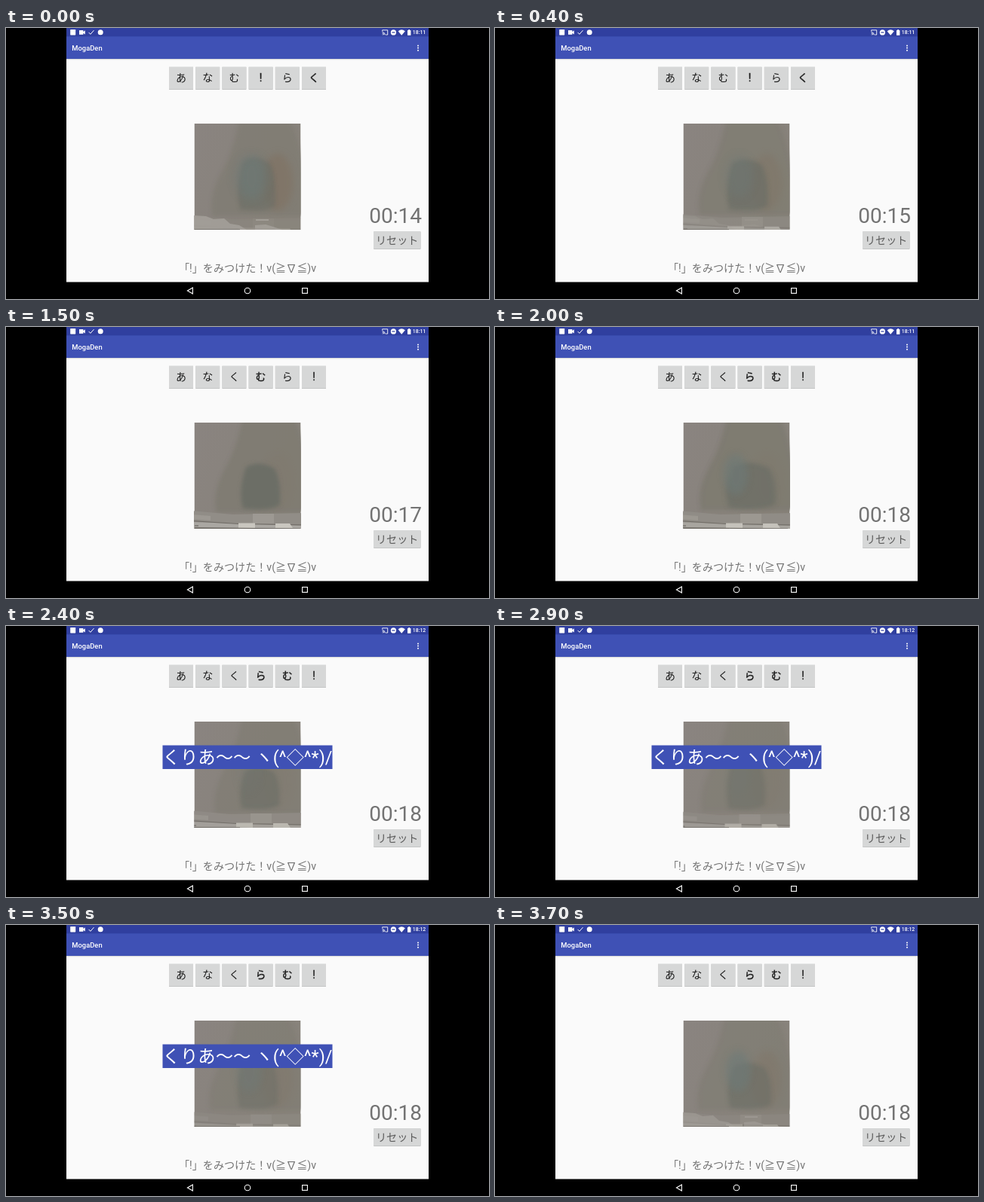
Animation, 640 px wide and 360 px high, one loop 3.8 s. Source, as an HTML page:

```html
<!DOCTYPE html>
<html lang="ja">
<head>
<meta charset="utf-8">
<title>MogaDen</title>
<style>
html, body { margin: 0; width: 100%; height: 100%; overflow: hidden; background: #000; }
svg { display: block; width: 100vw; height: 100vh; }
text { font-family: Roboto, "Noto Sans CJK JP", "Noto Sans CJK", sans-serif; }
.mid { text-anchor: middle; }
.white { fill: #fff; }
.line { fill: none; stroke: #fff; }
.tiles { font-size: 14px; fill: #1c1c1c; }
.tiles tspan { stroke: #1c1c1c; stroke-width: .35px; }
.timer { font-size: 28px; fill: #737373; text-anchor: end; }
.clock { font-size: 6.9px; font-weight: 500; fill: #fff; text-anchor: end; }

/* hard switches */
.sw { visibility: hidden; animation: 3800ms step-end infinite; }
.s14 { animation-name: s14; } .s15 { animation-name: s15; } .s16 { animation-name: s16; }
.s17 { animation-name: s17; } .s18 { animation-name: s18; }
.o1 { animation-name: o1; } .o2 { animation-name: o2; } .o3 { animation-name: o3; } .o4 { animation-name: o4; }
.m11 { animation-name: m11; } .m12 { animation-name: m12; } .clear { animation-name: clear; }
@keyframes s14 { 0% { visibility: visible } 10.5%, 100% { visibility: hidden } }
@keyframes s15 { 0% { visibility: hidden } 10.5% { visibility: visible } 23.6%, 100% { visibility: hidden } }
@keyframes s16 { 0% { visibility: hidden } 23.6% { visibility: visible } 36.8%, 100% { visibility: hidden } }
@keyframes s17 { 0% { visibility: hidden } 36.8% { visibility: visible } 49.9%, 100% { visibility: hidden } }
@keyframes s18 { 0% { visibility: hidden } 49.9%, 100% { visibility: visible } }
@keyframes o1 { 0% { visibility: visible } 15.7%, 100% { visibility: hidden } }
@keyframes o2 { 0% { visibility: hidden } 15.7% { visibility: visible } 34.2%, 100% { visibility: hidden } }
@keyframes o3 { 0% { visibility: hidden } 34.2% { visibility: visible } 49.9%, 100% { visibility: hidden } }
@keyframes o4 { 0% { visibility: hidden } 49.9%, 100% { visibility: visible } }
@keyframes m11 { 0% { visibility: visible } 57.8%, 100% { visibility: hidden } }
@keyframes m12 { 0% { visibility: hidden } 57.8%, 100% { visibility: visible } }
@keyframes clear { 0% { visibility: hidden } 55.2% { visibility: visible } 94.7%, 100% { visibility: hidden } }

/* camera view */
.cam * { transform-box: fill-box; transform-origin: center; }
.wall, .core, .tint, .warm, .floor, .lumps { animation: 3800ms linear infinite; }
.wall { animation-name: wall; } .core { animation-name: core; } .tint { animation-name: tint; }
.warm { animation-name: warm; } .floor { animation-name: floor; } .lumps { animation-name: lumps; }
@keyframes wall {
  0%, 100% { transform: translate(4px, 4px); opacity: .7 }
  23.7% { transform: translate(-2px, 0); opacity: .8 }
  39.5% { transform: translate(9px, 0); opacity: .9 }
  52.6% { transform: translate(3px, -3px); opacity: 1 }
  63.2% { transform: translate(8px, 3px); opacity: .6 }
  86.8% { transform: translate(2px, 0); opacity: .5 }
  97.4% { transform: translate(0, 0); opacity: .6 }
}
@keyframes core {
  0%, 100% { transform: translate(-5px, -2px) scale(.95, 1.15); opacity: .6 }
  23.7% { transform: translate(0, 0) scale(1.15, 1.05); opacity: .8 }
  39.5% { transform: translate(0, 2px) scale(1); opacity: 1 }
  52.6% { transform: translate(2px, 1px) scale(1.25, 1); opacity: .75 }
  63.2% { transform: translate(-1px, 6px) scale(1, .9); opacity: .65 }
  86.8% { transform: translate(-8px, -5px) scale(.95, 1.3); opacity: .4 }
  97.4% { transform: translate(0, 4px) scale(1.1, 1); opacity: .6 }
}
@keyframes tint {
  0%, 100% { transform: translate(3px, 2px) scale(1.25, 1.1); opacity: .6 }
  23.7%, 39.5% { transform: none; opacity: 0 }
  52.6% { transform: translate(-3px, 0); opacity: .6 }
  63.2%, 86.8% { transform: none; opacity: .1 }
  97.4% { transform: translate(0, -2px); opacity: .6 }
}
@keyframes warm { 0%, 100% { opacity: .55 } 23.7%, 63.2% { opacity: .1 } 86.8% { opacity: .15 } 97.4% { opacity: .3 } }
@keyframes floor {
  0%, 100% { transform: translate(0, 5px); opacity: .25 }
  23.7%, 39.5% { transform: none; opacity: 1 }
  52.6% { transform: translate(-2px, 0); opacity: .95 }
  63.2% { transform: translate(-3px, 1px); opacity: .8 }
  86.8% { transform: translate(-4px, 3px); opacity: .5 }
  97.4% { transform: translate(-2px, 4px); opacity: .4 }
}
@keyframes lumps { 0%, 100% { opacity: .85 } 15%, 92% { opacity: 0 } }
</style>
</head>
<body>
<svg viewBox="0 0 640 360">
  <defs>
    <linearGradient id="wallTone" x1="0" x2="1" y1="0" y2=".4">
      <stop offset="0" stop-color="#8a8480"/>
      <stop offset="1" stop-color="#87827a"/>
    </linearGradient>
    <clipPath id="view"><rect x="249.5" y="127" width="141" height="141"/></clipPath>
    <filter id="soft" x="-30%" y="-30%" width="160%" height="160%"><feGaussianBlur stdDeviation="2.5"/></filter>
    <filter id="softer" x="-50%" y="-50%" width="200%" height="200%"><feGaussianBlur stdDeviation="5"/></filter>
  </defs>

  <rect width="640" height="360"/>
  <rect x="80" width="480" height="337.5" fill="#fafafa"/>
  <rect x="80" y="41" width="480" height="1.2" fill="#dcdcdc"/>
  <rect x="80" width="480" height="41" fill="#3f51b5"/>
  <rect x="80" width="480" height="11.3" fill="#303f9f"/>

  <!-- status bar -->
  <g class="white">
    <rect x="85.2" y="2" width="7" height="7.4" rx=".6"/>
    <path d="M97 3h5.4v2l2.4-1.7v5.2l-2.4-1.7v2H97z"/>
    <circle cx="125.2" cy="5.8" r="3.5"/>
    <circle cx="513.4" cy="5.9" r="3.6"/>
    <path d="M519.6 4.2q4.6-3.8 9.2 0l-4.6 5.5z"/>
    <path d="M532 3h1.3v-.9h1.8V3h1.3v6.7H532z"/>
  </g>
  <path class="line" d="M109.6 5.9l2.3 2.4 4.6-5.2"/>
  <path class="line" stroke-width=".9" d="M498.7 4.6V2.8h7v6.2h-2.5M498.7 8.9h.9M498.7 7q2 0 2.2 2.2M498.7 5.5q3.4.2 3.7 3.7"/>
  <path d="M511.4 5.9h4" stroke="#303f9f" stroke-width="1.2"/>
  <text class="clock sw m11" x="556.3" y="8.4">18:11</text>
  <text class="clock sw m12" x="556.3" y="8.4">18:12</text>

  <!-- app bar -->
  <text class="white" x="87.3" y="29.8" font-size="9.4" font-weight="500">MogaDen</text>
  <g class="white">
    <circle cx="546" cy="23.4" r="1"/><circle cx="546" cy="26.6" r="1"/><circle cx="546" cy="29.8" r="1"/>
  </g>

  <!-- letter tiles -->
  <path stroke="#c4c5c5" stroke-width="30" stroke-dasharray="32 3.2" d="M216 66.9H424.2"/>
  <path stroke="#d6d7d7" stroke-width="29.4" stroke-dasharray="32 3.2" d="M216 66.2H424.2"/>
  <g class="tiles mid">
    <text class="sw o1" x="232 267.2 302.4 337.6 372.8 408" y="71.4">あなむ<tspan>!</tspan>ら<tspan>く</tspan></text>
    <text class="sw o2" x="232 267.2 302.4 337.6 372.8 408" y="71.4">あなく<tspan>!</tspan>ら<tspan>む</tspan></text>
    <text class="sw o3" x="232 267.2 302.4 337.6 372.8 408" y="71.4">あなく<tspan>む</tspan>ら<tspan>!</tspan></text>
    <text class="sw o4" x="232 267.2 302.4 337.6 372.8 408" y="71.4">あなく<tspan>らむ!</tspan></text>
  </g>

  <!-- camera view -->
  <g class="cam" clip-path="url(#view)">
    <rect x="249.5" y="127" width="141" height="141" fill="url(#wallTone)"/>
    <path class="wall" filter="url(#soft)" fill="#7f7b72" d="M305 118H372Q386 150 394 195V246H270Q264 222 280 190Q298 160 305 118Z"/>
    <ellipse class="warm" filter="url(#softer)" cx="360" cy="205" rx="20" ry="38" fill="#80705f"/>
    <path class="core" filter="url(#soft)" fill="#6c6e66" d="M318 184Q336 174 356 186Q365 202 363 234Q352 243 314 239Q307 216 318 184Z"/>
    <ellipse class="tint" filter="url(#softer)" cx="322" cy="196" rx="16" ry="27" fill="#6d7a78"/>
    <g class="floor">
      <path fill="#918d87" d="M245 244L300 249 396 247V275H245Z"/>
      <path fill="#9d9993" d="M245 249l26 2v6l-26-2zM327 248h28v13h-28z"/>
      <path fill="#aaa7a2" d="M245 259L396 264V275H245Z"/>
      <path fill="none" stroke="#69655f" stroke-width=".9" d="M245 257.5L308 261.5 396 263"/>
      <path fill="#c9c6bf" d="M308 260.5h22v7h-22zM357 261h19l4 6h-23z"/>
      <path fill="none" stroke="#5f5b56" d="M250 264h5M250 266.8L390 268"/>
    </g>
    <path class="lumps" fill="#a5a19b" d="M249 249l16 1 10 4 14-1 8 7 12 2 10 6H249zM331 254h17v2h-17zM330 262l14-1 10 3 12 4h-36z"/>
    <path fill="none" stroke="#6a6660" stroke-width=".8" d="M249.5 267.6H310"/>
  </g>

  <!-- timer and reset -->
  <text class="timer sw s14" x="551" y="259.3">00:14</text>
  <text class="timer sw s15" x="551" y="259.3">00:15</text>
  <text class="timer sw s16" x="551" y="259.3">00:16</text>
  <text class="timer sw s17" x="551" y="259.3">00:17</text>
  <text class="timer sw s18" x="551" y="259.3">00:18</text>
  <rect x="487" y="270.6" width="62.6" height="23.4" rx="1" fill="#c4c5c5"/>
  <rect x="487" y="270" width="62.6" height="23" rx="1" fill="#d6d7d7"/>
  <text class="mid" x="518.2" y="286.7" font-size="14.1" fill="#5c5c5c">リセット</text>

  <text class="mid" x="320" y="324" font-size="14.1" fill="#737373">「!」をみつけた！v(≧∇≦)v</text>

  <g class="sw clear">
    <rect x="207.5" y="158.5" width="225" height="31.5" fill="#3f51b5"/>
    <text class="mid white" x="320" y="183" font-size="23.4">くりあ〜〜 ヽ(^◇^*)/</text>
  </g>

  <!-- navigation bar -->
  <g class="line" stroke-width="1.1">
    <path d="M247.4 345V353L240.4 349Z"/>
    <circle cx="320" cy="349" r="3.8"/>
    <rect x="392.6" y="345.6" width="6.8" height="6.8"/>
  </g>
</svg>
</body>
</html>
```
